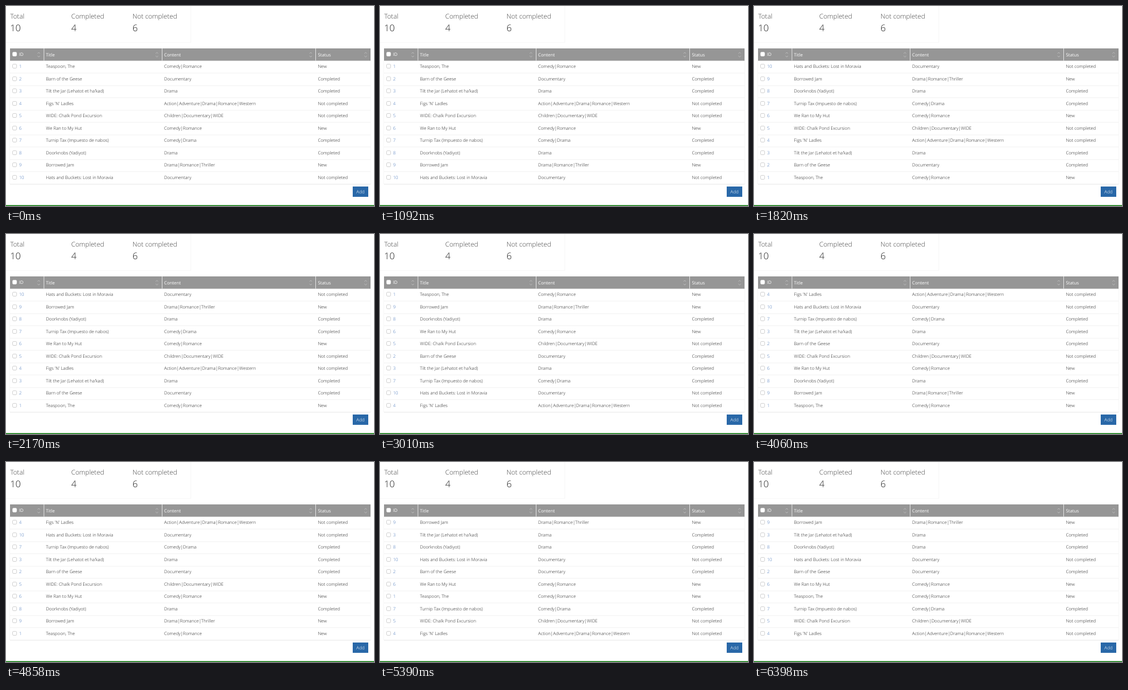
These frames come from a looping animation (640x349 px, 7.07 s). An HTML page with a canvas:

```html
<!DOCTYPE html>
<html lang="en">
<head>
<meta charset="utf-8">
<title>Sortable table</title>
<style>
  html, body { margin: 0; width: 100%; height: 100%; overflow: hidden; background: #fff; }
  canvas { display: block; width: 640px; height: 349px; }
</style>
</head>
<body>
<canvas id="stage"></canvas>
<script>
const W = 640, H = 349, LOOP = 7070;
const ROW_TOP = 95.5, ROW_H = 21.5;
const LEFT = 7, RIGHT = 634;
const BODY = 7.75;
const COLS = { id: 22.7, title: 69.5, content: 275, status: 542.5 };

const films = [
  ["Teaspoon, The", "Comedy|Romance", "New"],
  ["Barn of the Geese", "Documentary", "Completed"],
  ["Tilt the Jar (Lehatot et ha'kad)", "Drama", "Completed"],
  ["Figs 'N' Ladles", "Action|Adventure|Drama|Romance|Western", "Not completed"],
  ["WIDE: Chalk Pond Excursion", "Children|Documentary|WIDE", "Not completed"],
  ["We Ran to My Hut", "Comedy|Romance", "New"],
  ["Turnip Tax (Impuesto de nabos)", "Comedy|Drama", "Completed"],
  ["Doorknobs (Yadiyot)", "Drama", "Completed"],
  ["Borrowed Jam", "Drama|Romance|Thriller", "New"],
  ["Hats and Buckets: Lost in Moravia", "Documentary", "Not completed"]
];

const byId = films.map((_, i) => i + 1);
const byStatus = [1, 9, 8, 6, 5, 2, 3, 7, 10, 4];
const byContent = [9, 3, 8, 10, 2, 6, 1, 7, 5, 4];
const sorts = [
  { at: 0, ids: byId },
  { at: 1820, ids: [...byId].reverse() },
  { at: 3010, ids: byStatus },
  { at: 4060, ids: [...byStatus].reverse() },
  { at: 5390, ids: byContent }
];

const canvas = document.getElementById("stage");
const ctx = canvas.getContext("2d");
const dpr = window.devicePixelRatio || 1;
canvas.width = Math.round(W * dpr);
canvas.height = Math.round(H * dpr);
ctx.scale(dpr, dpr);
ctx.textRendering = "geometricPrecision";

function box(x, y, w, h, color) {
  ctx.fillStyle = color;
  ctx.fillRect(x, y, w, h);
}

function text(str, x, y, size, color, weight = 300, align = "left") {
  ctx.font = `${weight} ${size}px "Open Sans", sans-serif`;
  ctx.textAlign = align;
  ctx.fillStyle = color;
  ctx.fillText(str, x, y);
}

function checkbox(y, stroke) {
  ctx.beginPath();
  ctx.roundRect(11.5, y, 7, 7, 1.8);
  ctx.fillStyle = "#fff";
  ctx.fill();
  ctx.strokeStyle = stroke;
  ctx.lineWidth = 0.8;
  ctx.stroke();
}

function chevron(x, y, dir) {
  ctx.beginPath();
  ctx.moveTo(x - 2.2, y + dir);
  ctx.lineTo(x, y - dir);
  ctx.lineTo(x + 2.2, y + dir);
  ctx.strokeStyle = "#c6c6c6";
  ctx.lineWidth = 0.8;
  ctx.stroke();
}

function drawSummary() {
  box(0, 63, 322, 1, "#f7f7f7");
  box(321, 0, 1, 64, "#f7f7f7");
  const stats = [["Total", 10, 7.3], ["Completed", 4, 113.5], ["Not completed", 6, 220]];
  for (const [label, value, x] of stats) {
    text(label, x, 22, 11.6, "#444");
    text(value, x, 44, 16, "#1c1c1c");
  }
}

function drawHeader() {
  box(LEFT, 74, RIGHT - LEFT, 21.5, "#969696");
  for (const x of [65.5, 271, 538]) box(x, 74, 1, 21.5, "#e4e4e4");
  checkbox(80.5, "#eee");
  text("ID", COLS.id, 87, BODY, "#fff", 400);
  text("Title", COLS.title, 88, BODY, "#fff", 400);
  text("Content", COLS.content, 88, BODY, "#fff", 400);
  text("Status", COLS.status, 88, BODY, "#fff", 400);
  for (const x of [57, 262.5, 530, 625.5]) {
    chevron(x, 82, 1);
    chevron(x, 88, -1);
  }
}

function drawRow(id, i) {
  const top = ROW_TOP + i * ROW_H;
  const base = Math.round(top + 12.6);
  const [title, content, status] = films[id - 1];
  checkbox(Math.round(top + 5.6) + 0.5, "#c4c4c4");
  text(id, COLS.id, base, BODY, "#3f70b8");
  text(title, COLS.title, base, BODY, "#1c1c1c");
  text(content, COLS.content, base, BODY, "#1c1c1c");
  text(status, COLS.status, base, BODY, "#1c1c1c");
  box(LEFT, Math.round(top + ROW_H) - 0.5, RIGHT - LEFT, 1, i === 9 ? "#e6e6e6" : "#f1f1f1");
}

function draw(t) {
  box(0, 0, W, H, "#fff");
  drawSummary();
  drawHeader();
  sorts.findLast(s => s.at <= t).ids.forEach(drawRow);
  box(LEFT - 1, 95, 1, 216, "#f7f7f7");
  box(RIGHT, 95, 1, 216, "#f7f7f7");
  box(603, 315, 27, 18, "#2968a8");
  text("Add", 616.5, 327, 8, "#fff", 300, "center");
  box(0, 347.5, W, 1.5, "#0b780b");
}

const start = performance.now();
function tick() {
  draw((performance.now() - start) % LOOP);
  requestAnimationFrame(tick);
}
tick();
</script>
</body>
</html>
```
